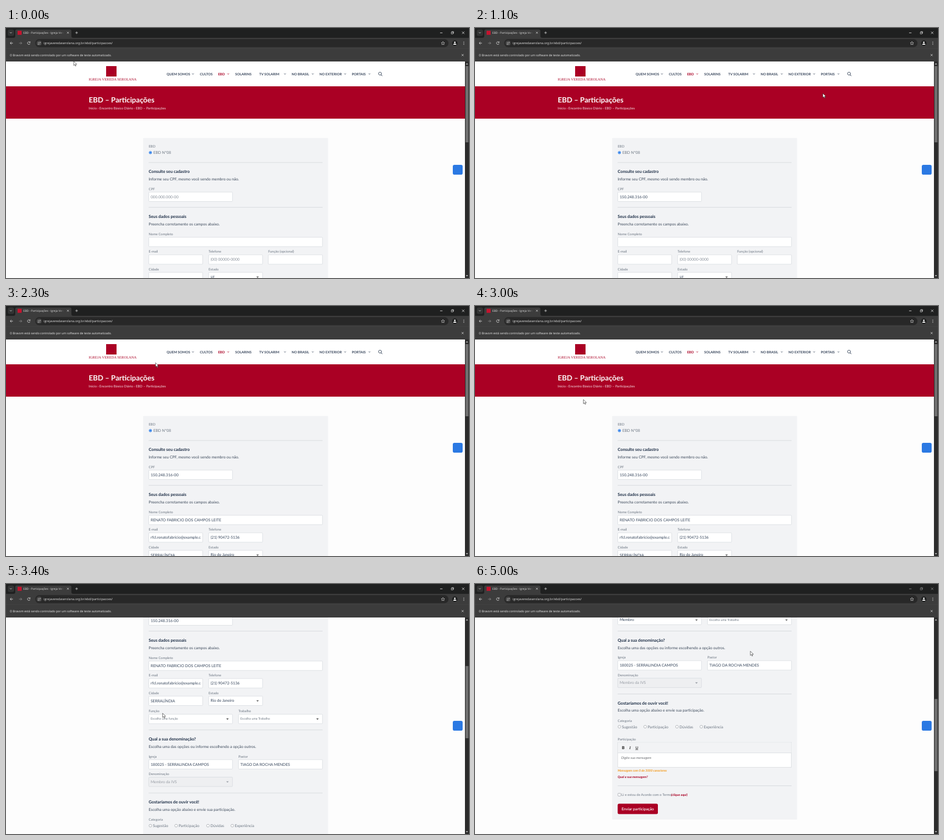
Write an HTML page that moves like this. It is 800 by 433 pixels and loops after 5.1 s.

```html
<!DOCTYPE html>
<html lang="pt-BR">
<head>
<meta charset="utf-8">
<title>EBD - Participações</title>
<style>
html, body { margin: 0; width: 100%; height: 100%; overflow: hidden; background: #fdfdfd; }
svg { display: block; width: 100vw; height: 100vh; }
text { font-family: Lato, sans-serif; text-rendering: geometricPrecision; white-space: pre; }
.ui { font-family: "Open Sans", "Noto Sans", sans-serif; }
.serif { font-family: "Liberation Serif", serif; }
</style>
</head>
<body>
<svg id="stage" viewBox="0 0 800 433" preserveAspectRatio="none"></svg>
<script>
const NS = "http://www.w3.org/2000/svg";
const stage = document.getElementById("stage");
const LOOP = 5100, STEP = 100;
const RED = "#aa0024", NAVY = "#1b2c44", BODY = "#3d4a5b", LABEL = "#6d7783",
      VALUE = "#34445a", HINT = "#858d97", LINE = "#d3d6da", LIGHT = "#e3e3e3";

function add(parent, tag, attrs, content) {
  const node = document.createElementNS(NS, tag);
  for (const key in attrs) node.setAttribute(key, attrs[key]);
  if (content !== undefined) node.textContent = content;
  parent.appendChild(node);
  return node;
}
const group = (parent, attrs = {}) => add(parent, "g", attrs);
const rect = (p, x, y, width, height, fill, extra) =>
  add(p, "rect", { x, y, width, height, fill, ...extra });
const text = (p, x, y, size, fill, content, extra) =>
  add(p, "text", { x, y, "font-size": size, fill, ...extra }, content);
const stroke = (p, d, color, width = 0.8, extra) =>
  add(p, "path", { d, fill: "none", stroke: color, "stroke-width": width, ...extra });
const circle = (p, cx, cy, r, fill, extra) => add(p, "circle", { cx, cy, r, fill, ...extra });

const chevron = (p, x, y, color, s = 1.5) =>
  stroke(p, `M${x - s} ${y - s / 2}l${s} ${s}l${s} ${-s}`, color, 0.8);
const cross = (p, x, y, s, color) =>
  stroke(p, `M${x - s} ${y - s}l${2 * s} ${2 * s}m0 ${-2 * s}l${-2 * s} ${2 * s}`, color, 0.7);
const bold = { "font-weight": 700 };
const label = (p, x, y, content) => text(p, x, y, 5.83, LABEL, content);
const value = (p, x, y, content, fill = VALUE, size = 6.67) => text(p, x, y, size, fill, content);
const rule = (p, y) => rect(p, 246.5, y - 0.4, 300.5, 0.8, LINE);
const radio = (p, x, y) => circle(p, x, y, 2.4, "#fff", { stroke: "#747a82", "stroke-width": 0.5 });

function field(p, x, y, width, fill = "#fff") {
  rect(p, x + 0.2, y + 0.2, width - 0.4, 16.3, fill, { rx: 1, stroke: "#cfd3d8", "stroke-width": 0.6 });
}
function select(p, x, y, width, fill, arrow = "#555") {
  field(p, x, y, width, fill);
  add(p, "path", { d: `M${x + width - 11} ${y + 7.4}h4.4l-2.2 2.4z`, fill: arrow });
}
function section(p, y, title, note) {
  text(p, 246.5, y, 7.25, NAVY, title, bold);
  text(p, 246.5, y + 12.7, 6.67, BODY, note);
}

rect(stage, 0, 0, 800, 433, "#fdfdfd");
const page = group(stage);
const frame = group(stage);

// Site header
rect(page, 0, 58, 793, 43, "#fff");
rect(page, 173, 66, 18, 18, RED);
text(page, 143, 91.2, 6.25, RED, "IGREJA VEREDA SEROLANA", { class: "serif" });
[
  ["QUEM SOMOS", 277.5, 323], ["CULTOS", 335], ["EBD", 366.5, 384], ["SOLARINS", 396],
  ["TV SOLARIM", 437.5, 482], ["NO BRASIL", 493.5, 530], ["NO EXTERIOR", 541.5, 586],
  ["PORTAIS", 597.5, 628]
].forEach(([name, x, arrow]) => {
  const color = name === "EBD" ? RED : "#36445a";
  text(page, x, 81.6, 5.83, color, name, bold);
  if (arrow) chevron(page, arrow, 79.5, color);
});
circle(page, 646.2, 79, 2.5, "none", { stroke: "#36445a", "stroke-width": 0.9 });
stroke(page, "M648 81l2.2 2.2", "#36445a", 1);

// Banner
rect(page, 0, 101, 793, 56, RED);
text(page, 143, 129, 12.6, "#fff", "EBD – Participações", bold);
text(page, 143, 141.2, 5.83, "#f3dfe3", "Início › Encontro Básico Diário › EBD – Participações");

// Form
rect(page, 237, 190.5, 319.5, 618, "#f2f3f5", { rx: 1 });
label(page, 246.5, 207.3, "EBD");
circle(page, 249.5, 215.8, 2.3, "#fff", { stroke: "#1a73e8", "stroke-width": 0.8 });
circle(page, 249.5, 215.8, 1.5, "#1a73e8");
text(page, 254.7, 218.3, 6.67, LABEL, "EBD N°08");
rule(page, 233);
section(page, 251.3, "Consulte seu cadastro", "Informe seu CPF, mesmo você sendo membro ou não.");
label(page, 246.5, 280.7, "CPF");
field(page, 246.5, 284, 145);
const cpf = value(page, 250, 294.8, "");
rule(page, 310.7);
section(page, 329, "Seus dados pessoais", "Preencha corretamente os campos abaixo.");
label(page, 246.5, 358.5, "Nome Completo");
field(page, 246.5, 362.2, 300.5);
label(page, 246.5, 389.2, "E-mail");
field(page, 246.5, 392.6, 93.5);
label(page, 350, 389.2, "Telefone");
field(page, 350, 392.6, 93.5);
label(page, 246.5, 419.6, "Cidade");
field(page, 246.5, 423, 93.5);
label(page, 350, 419.6, "Estado");
select(page, 350, 423, 93.5);

const blank = group(page);
label(blank, 453, 389.2, "Função (opcional)");
field(blank, 453, 392.6, 94);
value(blank, 353.5, 403.4, "(00) 00000-0000", HINT);
value(blank, 353.5, 433.4, "UF", VALUE, 5.42);

const filled = group(page);
const clip = add(page, "clipPath", { id: "mail" });
rect(clip, 247, 392, 89.7, 18, "#000");
value(filled, 250, 373, "RENATO FABRICIO DOS CAMPOS LEITE");
value(group(filled, { "clip-path": "url(#mail)" }), 250, 403.4, "rfcl.renatofabricio@example.com");
value(filled, 353.5, 403.4, "(21) 90472-5136");
value(filled, 250, 433.9, "SERRALÍNDIA");
value(filled, 353.5, 433.2, "Rio de Janeiro");

label(page, 246.5, 451, "Função");
select(page, 246.5, 454.4, 145);
const role = value(page, 250, 464.3, "", LABEL);
label(page, 401.5, 451, "Trabalho");
select(page, 401.5, 454.4, 145.5);
value(page, 405, 464.3, "Escolha uma Trabalho", LABEL, 5.42);
rule(page, 481.8);
section(page, 500.4, "Qual a sua denominação?", "Escolha uma das opções ou informe escolhendo a opção outros.");
label(page, 246.5, 529.6, "Igreja");
field(page, 246.5, 533, 145);
value(page, 250, 543.9, "180025 - SERRALINDIA CAMPOS");
label(page, 401.5, 529.6, "Pastor");
field(page, 401.5, 533, 145.5);
value(page, 405, 543.9, "TIAGO DA ROCHA MENDES");
label(page, 246.5, 560, "Denominação");
select(page, 246.5, 563.3, 145, "#eeeff1", "#9a9fa6");
value(page, 250, 573.5, "Membro da IVS", "#989da5");
rule(page, 591);
section(page, 609.2, "Gostaríamos de ouvir você!", "Escolha uma opção abaixo e envie sua participação.");
label(page, 246.5, 639.3, "Categoria");
[["Sugestão", 249.5], ["Participação", 294], ["Dúvidas", 349], ["Experiência", 391]]
  .forEach(([name, x]) => {
    radio(page, x, 647.6);
    text(page, x + 4.2, 650.2, 6.67, LABEL, name);
  });

// Message editor
label(page, 246.5, 671.2, "Participação");
rect(page, 246.8, 674.6, 299.9, 43.2, "#fff", { stroke: "#cfd3d8", "stroke-width": 0.6 });
rect(page, 247.1, 674.9, 299.3, 18, "#f2f3f5");
rect(page, 246.8, 692.7, 299.9, 0.6, "#cfd3d8");
text(page, 253.8, 686.5, 7, "#333", "B", { "font-weight": 900 });
text(page, 266.6, 686.5, 7, "#333", "I", { "font-weight": 700, "font-style": "italic", class: "serif" });
text(page, 277.2, 686, 6.4, "#333", "U", bold);
rect(page, 277, 687, 5, 0.7, "#333");
const italic = { "font-style": "italic" };
const strong = { ...italic, ...bold };
text(page, 252.7, 703.5, 5.9, "#6c6f73", "Digite sua mensagem", italic);
text(page, 246.5, 725.4, 5.42, "#f39a1c", "Mensagem com 0 de 3000 caracteres", strong);
text(page, 246.5, 736.8, 5.42, RED, "Qual a sua mensagem?", strong);
rule(page, 749.8);
rect(page, 247, 762.9, 4.8, 4.8, "#fff", { rx: 0.8, stroke: "#747a82", "stroke-width": 0.5 });
text(page, 253, 767.8, 5.83, LABEL, "Li e estou de Acordo com o Termo");
text(page, 339, 767.8, 5.6, RED, "(clique aqui)", strong);
rect(page, 246.5, 780.8, 69.5, 18, RED, { rx: 2.5 });
text(page, 281.2, 792.1, 6.67, "#fff", "Enviar participação", { "text-anchor": "middle", "font-weight": 600 });

// Scrollbar and floating button
rect(frame, 793, 58, 7, 375, "#2c2c2c");
const thumb = rect(frame, 794, 66, 5, 132, "#9b9b9b", { opacity: 0.6 });
add(frame, "path", { d: "M794.6 63.3h3.8l-1.9-2.6z", fill: "#bbb" });
add(frame, "path", { d: "M794.6 428h3.8l-1.9 2.6z", fill: "#bbb" });
rect(frame, 772, 237, 17, 17, "#2b79e3", { rx: 2.8 });

// Browser window
rect(frame, 0, 0, 800, 17, "#1f2020");
rect(frame, 0, 17, 800, 41, "#3c3c3c");
rect(frame, 0, 35.2, 800, 0.5, "#484848");
rect(frame, 3, 2.6, 11, 11.2, "#323333", { rx: 3.4 });
chevron(frame, 8.4, 8.2, LIGHT, 1.6);
add(frame, "path", { d: "M13 17q3 0 3-3V5.5q0-3 3-3h91q3 0 3 3V14q0 3 3 3z", fill: "#3c3c3c" });
rect(frame, 20, 4.8, 7, 7, "#c5142f");
const fade = add(frame, "linearGradient", { id: "fade", gradientUnits: "userSpaceOnUse", x1: 92, x2: 100, y1: 0, y2: 0 });
add(fade, "stop", { offset: 0, "stop-color": LIGHT });
add(fade, "stop", { offset: 1, "stop-color": LIGHT, "stop-opacity": 0 });
text(frame, 30, 10.2, 4.8, "url(#fade)", "EBD - Participações - Igreja Vereda Serolana", { class: "ui" });
cross(frame, 107, 8.2, 1.6, LIGHT);
stroke(frame, "M119.8 8.2h4.4m-2.2-2.2v4.4", LIGHT, 0.7);
const controls = group(frame);
stroke(controls, "M750 8.4h4.2", "#fff", 0.7);
stroke(controls, "M769.4 7.2h3v3h-3zM770.4 7v-.8h3v3h-.8", "#fff", 0.6);
cross(controls, 790, 8.3, 2, "#fff");

stroke(frame, "M12 26.2H7.2m2.2-2.2l-2.2 2.2l2.2 2.2", LIGHT);
stroke(frame, "M22.6 26.2h4.8m-2.2-2.2l2.2 2.2l-2.2 2.2", "#8b8b8b");
stroke(frame, "M41.4 25a2.3 2.3 0 1 0 .2 1.9M41.7 23.4v1.8h-1.8", LIGHT);
rect(frame, 50.5, 19.3, 714, 14, "#282828", { rx: 7 });
circle(frame, 57.3, 26.3, 5, "#3c3c3c");
stroke(frame, "M54.8 25h2.4m2.4 2.8h-2.4", LIGHT, 0.7);
circle(frame, 58.8, 25, 0.8, "none", { stroke: LIGHT, "stroke-width": 0.6 });
circle(frame, 55.8, 27.8, 0.8, "none", { stroke: LIGHT, "stroke-width": 0.6 });
text(frame, 65, 28.3, 5.45, LIGHT, "igrejaveredaserolana.org.br/ebd/participacoes/", { class: "ui" });
stroke(frame, "M755 23.4l.9 1.9 2.1.2-1.6 1.4.5 2.1-1.9-1.1-1.9 1.1.5-2.1-1.6-1.4 2.1-.2z", LIGHT, 0.6);
circle(frame, 775.5, 26.3, 4.7, "#1f2020");
circle(frame, 775.5, 24.9, 1.3, "#fff");
add(frame, "path", { d: "M772.8 29v-.6q.6-1.6 2.7-1.6t2.7 1.6v.6z", fill: "#fff" });
for (const y of [24.2, 26.3, 28.4]) circle(frame, 791, y, 0.6, LIGHT);
text(frame, 6.5, 49, 5.13, "#f0f0f0", "O Bravom está sendo controlado por um software de teste automatizado.", { class: "ui" });
cross(frame, 789, 46.9, 1.7, LIGHT);

const cursor = add(stage, "path", {
  d: "M0 0v7.3l1.7-1.6 1.2 2.7 1.2-.6-1.2-2.5h2.4z",
  fill: "#fff", stroke: "#111", "stroke-width": 0.55, "stroke-linejoin": "round"
});

// Motion: [time, values...]
const pointerPath = [[0, 117, 57.6], [1100, 601, 113.2], [2300, 258.4, 98.2], [3200, 167, 180.2],
  [3400, 270.6, 223.8], [3900, 387, 229.4], [4900, 469.4, 122.4], [5000, 475.8, 116.4]];
const scrollPath = [[3100, 0], [3200, 26.6], [3400, 229], [3500, 312], [3600, 372], [3700, 400.4]];
const CPF = "150.248.316-00";

function along(path, t) {
  if (t <= path[0][0]) return path[0].slice(1);
  const i = path.findIndex(k => k[0] > t);
  if (i < 0) return path[path.length - 1].slice(1);
  const a = path[i - 1], b = path[i], u = (t - a[0]) / (b[0] - a[0]);
  return a.slice(1).map((v, n) => v + (b[n + 1] - v) * u);
}
const show = (node, on) => node.setAttribute("display", on ? "inline" : "none");

function draw(time) {
  const t = Math.floor((time % LOOP) / STEP) * STEP;
  const [x, y] = along(pointerPath, t);
  const [scroll] = along(scrollPath, t);
  const loaded = t >= 2000, chosen = t >= 4400;

  cursor.setAttribute("transform", `translate(${x} ${y})`);
  page.setAttribute("transform", `translate(0 ${-scroll})`);
  thumb.setAttribute("y", 66 + scroll * 0.3325);
  thumb.setAttribute("height", loaded ? 125 : 132);

  const typed = CPF.slice(0, Math.max(0, Math.round((t - 500) / 400 * CPF.length)));
  cpf.textContent = typed || "000.000.000-00";
  cpf.setAttribute("fill", typed ? VALUE : HINT);
  show(blank, !loaded);
  show(filled, loaded);

  role.textContent = chosen ? "Membro" : "Escolha uma função";
  role.setAttribute("font-size", chosen ? 6.67 : 5.42);
  role.setAttribute("fill", chosen ? VALUE : LABEL);
  controls.setAttribute("opacity", chosen ? 0.55 : 1);
}

const start = performance.now();
function tick() {
  draw(performance.now() - start);
  requestAnimationFrame(tick);
}
tick();
</script>
</body>
</html>
```
